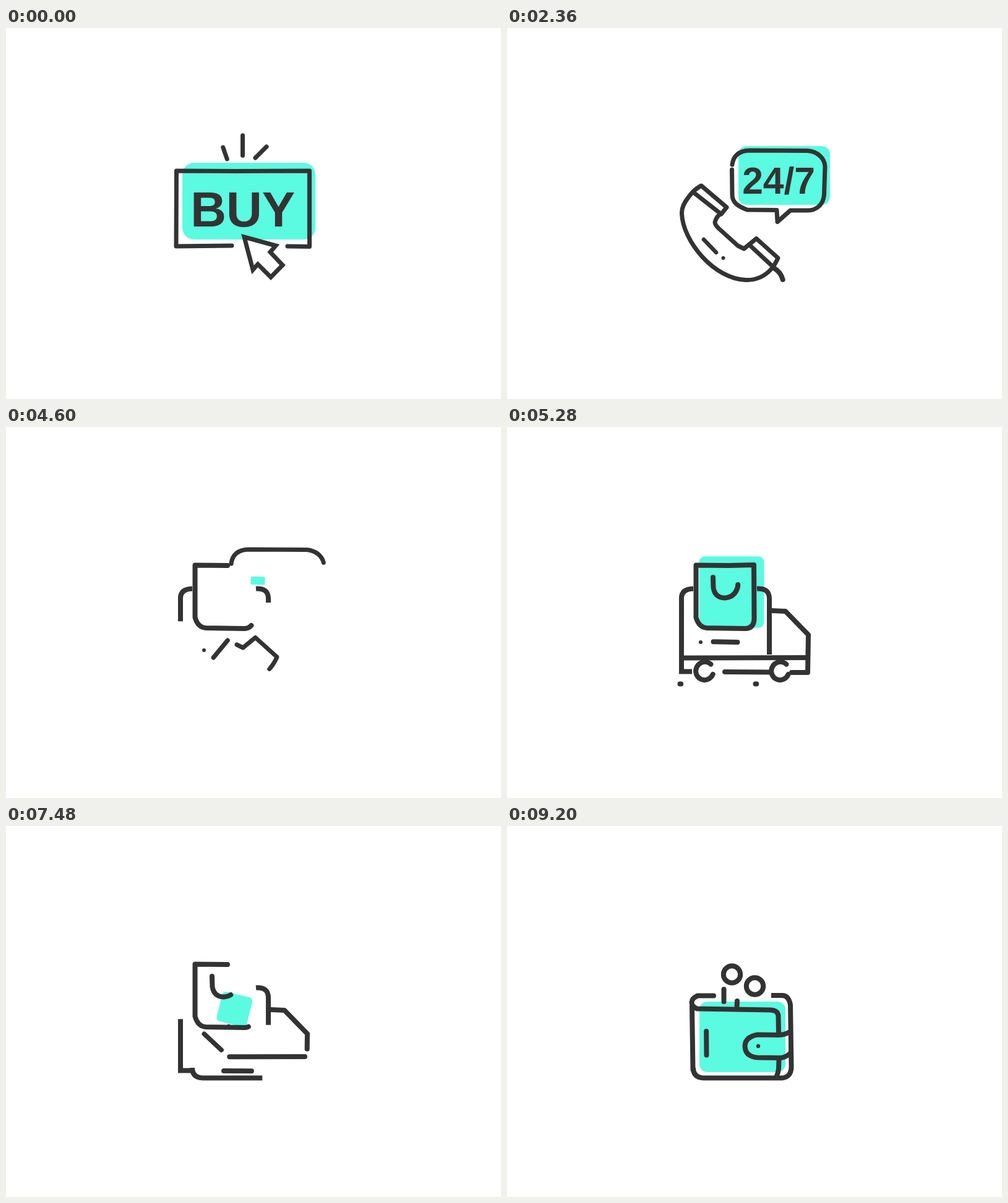
These frames come from a looping animation (800 px wide and 600 px high, 9880 ms). An HTML page:

```html
<!DOCTYPE html>
<html lang="en">
<head>
<meta charset="utf-8">
<title>Shopping icons</title>
<style>
  html, body { margin: 0; width: 100%; height: 100%; overflow: hidden; background: #fff; }
  svg { display: block; width: 100vw; height: 100vh; }
  text { font-family: "Liberation Sans", Arial, Helvetica, sans-serif; font-weight: 700; fill: #333; text-anchor: middle; }
  .ink { fill: none; stroke: #333; stroke-linejoin: round; }
</style>
</head>
<body>
<svg id="stage" viewBox="0 0 800 600"></svg>
<script>
const LOOP = 9880, STEP = 40;
const stage = document.getElementById('stage');

const ease = {
  lin: u => u,
  in: u => u * u,
  out: u => 1 - (1 - u) * (1 - u),
  io: u => u < .5 ? 4 * u ** 3 : 1 - 4 * (1 - u) ** 3
};

const add = (tag, attrs, text) => {
  const el = document.createElementNS('http://www.w3.org/2000/svg', tag);
  for (const k in attrs) el.setAttribute(k, attrs[k]);
  if (text) el.textContent = text;
  return stage.appendChild(el);
};
const show = (el, on) => el.setAttribute('visibility', on ? 'visible' : 'hidden');
const span = (t, [a, b]) => ease.io(Math.min(1, Math.max(0, (t - a) / (b - a))));

// keys: [time, easing into this key, ...values]
function track(keys, t) {
  if (t <= keys[0][0]) return keys[0].slice(2);
  for (let i = 1; i < keys.length; i++) {
    const a = keys[i - 1], b = keys[i];
    if (t < b[0]) {
      const p = ease[b[1]]((t - a[0]) / (b[0] - a[0]));
      return a.slice(2).map((v, j) => v + (b[j + 2] - v) * p);
    }
  }
  return keys[keys.length - 1].slice(2);
}

const parts = [];

// A stroke that draws itself on, then wipes off from its end (or its start with tail)
function stroke(d, on, off, { w = 7.5, cap = 'round', tail = false, spin = null } = {}) {
  const el = add('path', { d, class: 'ink', 'stroke-width': w, 'stroke-linecap': cap, pathLength: 100 });
  if (cap === 'butt') el.style.strokeLinejoin = 'miter';
  parts.push(t => {
    const a = on ? span(t, on) : 1, b = off ? span(t, off) : 0;
    const from = tail ? b : 0, to = tail ? a : a * (1 - b);
    show(el, to - from > .002);
    el.setAttribute('stroke-dasharray', to - from > .999 ? 'none' : `${(to - from) * 100} 300`);
    el.setAttribute('stroke-dashoffset', -from * 100);
    if (spin) el.setAttribute('transform', `rotate(${(t - 5000) * .4} ${spin})`);
  });
}

// values: centre x, centre y, angle, length, width
function bar(keys) {
  const el = add('line', { class: 'ink', 'stroke-linecap': 'round' });
  parts.push(t => {
    const [x, y, deg, len, w] = track(keys, t);
    const a = deg * Math.PI / 180, dx = Math.cos(a) * len / 2, dy = Math.sin(a) * len / 2;
    show(el, w > .1);
    const at = { x1: x - dx, y1: y - dy, x2: x + dx, y2: y + dy, 'stroke-width': w };
    for (const k in at) el.setAttribute(k, at[k]);
  });
}

// values: x, y, scale, angle
function sprite(el, keys) {
  parts.push(t => {
    const [x, y, s, r] = track(keys, t);
    show(el, s > .01);
    el.setAttribute('transform', `translate(${x} ${y}) rotate(${r}) scale(${s})`);
  });
}

const ring = (x, y, rx, ry = rx) =>
  `M${x} ${y - ry}A${rx} ${ry} 0 1 1 ${x} ${y + ry}A${rx} ${ry} 0 1 1 ${x} ${y - ry}`;

// Mint panel: centre x, centre y, width, height, angle, corner
const panel = add('rect', { fill: '#5bfbe1' });
const panelKeys = [
  [760, 'lin', 392.5, 280, 215, 124, 0, 19],
  [1240, 'in', 397, 277, 164, 95, 10, 15],
  [1480, 'lin', 419, 260, 6, 4, 20, 1],
  [2000, 'out', 448, 238.5, 148, 95, 0, 13],
  [4040, 'lin', 448, 238.5, 148, 95, 0, 13],
  [4600, 'in', 407, 248.5, 23, 13, 1.5, 2],
  [4680, 'lin', 398, 252, 2, 2, 0, 0],
  [5240, 'out', 363, 267, 105, 116, 0, 9],
  [5480, 'io', 363, 267, 92, 102, 0, 9],
  [7040, 'lin', 363, 267, 92, 102, 0, 9],
  [7480, 'in', 369.3, 296.5, 50, 49, 14, 6],
  [7600, 'lin', 372, 310, 6, 6, 20, 1],
  [8200, 'out', 381, 341, 146, 124, 0, 14],
  [8480, 'io', 380.5, 341, 139, 114, 0, 13]
];
parts.push(t => {
  const [x, y, w, h, r, c] = track(panelKeys, t);
  const at = { x: x - w / 2, y: y - h / 2, width: w, height: h, rx: c, transform: `rotate(${r} ${x} ${y})` };
  for (const k in at) panel.setAttribute(k, at[k]);
});

// Button frame
stroke('M365 352L275 353L275.5 231L372 231.5', null, [840, 1800], { w: 7 });
stroke('M367 231.5L490.5 231L490.5 353.5L455 353', null, [800, 1760], { w: 7 });

// Handset, speech bubble, cord
stroke('M373 352L383 357L403 340.5L438 372Q433 383 427 390C415 403 400 408 386 407.5C335 406 284 345 282.5 300Q282 288 293 274Q302 261 314 255L355 290L347 300Q339 303 336 314Q336 318 342 324L373 352',
  [1080, 2040], [4000, 4960], { w: 7 });
stroke('M364 221C366 205 377 198.5 392 198L486 198.5C502 200 513 210 514 224L512.5 270C511 286 500 295 486 295L458 295L437 313.5L436 294.5L388 294C375 289 364 283 364 270L363.5 229',
  [1240, 2040], [4074, 5034], { w: 7 });
stroke('M431 388Q443 395 446 408Q449 420 444 431', [2080, 2640], [4040, 4480], { w: 8 });

// Truck and bag
const body = { w: 8, cap: 'butt' }, bold = { w: 8 };
stroke('M301 261.5Q282 262 282 277L282 395.5L299 395.5', [4155, 5115], [7040, 8000], { ...body, tail: true });
stroke('M404 261.5Q424 260 424 278L424 368', [4195, 5155], [7040, 8000], body);
stroke('M358 224L305.5 223.5L305.5 308Q310 324 323 325L386 326Q400 325 399.5 308L399 223L358 224', [4074, 5034], [7040, 8000], bold);
stroke('M333 243L333.5 260Q336 276 352 276.5Q369 275 373 258L374 241.5', [4960, 5440], [7040, 8000], bold);
stroke('M428 297L450 298L487 336L486 397L460 397', [4600, 5080], [7040, 8000], bold);
stroke('M285 373.5L483 373', [4680, 5280], [7040, 8000], { w: 8, tail: true });
stroke('M352 396L425 396.5', [4800, 5360], [7040, 8000], bold);
for (const x of [319.5, 441.5]) {
  stroke(ring(x, 394.5, 14.7, 14.3), [5000, 5440], [7040, 7400], { w: 8, spin: `${x} 394.5` });
  stroke(`M${x - 40} 415.5h71`, [5200, 5640], [7040, 7400], bold);
}

// Wallet
stroke('M301 391Q301 407 318 407.5L445 407.5Q459 406 459.5 390L458 289Q455 274 445 274L427 274', [7040, 8000], null, body);
stroke('M300.5 394L299 292', [7520, 8000], null, bold);
stroke('M334 274.5L308 274.5C296 280 295 290 307 295.5L425 297.5Q438 298 438.5 307L439 335', [7480, 8360], null, bold);
stroke('M457 333Q448 338 438 338L405 337.5Q385 341 384.5 356Q385 373 405 374.5L440 375Q450 375 457 368', [7720, 8400], null, bold);
stroke('M439.5 377L439 393Q438 400 436 404', [8200, 8560], null, bold);
stroke('M350.5 284L350.5 264', [8560, 8960], null, bold);
stroke('M371.5 293L372 283', [8560, 8960], null, bold);
stroke(ring(363.5, 240, 13.7), [8640, 9200], null, bold);
stroke(ring(400.5, 259, 13.7), [8640, 9200], null, bold);

// Rays that turn into the ear pieces
bar([
  [1000, 'lin', 354, 202.5, 71, 20, 7],
  [1240, 'in', 336.3, 201.5, 71, 20, 7],
  [1960, 'out', 324.5, 284, 38, 55, 7],
  [4040, 'lin', 324.5, 284, 38, 55, 7],
  [4440, 'io', 324.5, 284, 38, 0, 0]
]);
bar([
  [1000, 'lin', 412, 201, -45, 25.5, 7],
  [1240, 'in', 441, 223.5, -6, 26, 7],
  [1960, 'out', 412.5, 370, 43, 50, 7],
  [4040, 'lin', 412.5, 370, 43, 50, 7],
  [4440, 'io', 412.5, 370, 43, 0, 0]
]);
// Dash that travels through all four icons
bar([
  [1000, 'lin', 382.5, 190, 90, 32.5, 7],
  [1240, 'in', 387.3, 196.3, 17.4, 32.4, 7],
  [2000, 'out', 328, 352.5, -134, 29, 6.5],
  [3320, 'lin', 328, 352.5, -134, 29, 6.5],
  [3620, 'io', 309, 409, -62, 32, 6.5],
  [3920, 'io', 328, 352.5, -134, 29, 6.5],
  [4040, 'lin', 328, 352.5, -134, 29, 6.5],
  [4600, 'in', 346.7, 359, -50.5, 36, 7.2],
  [5000, 'out', 353, 347.7, 1, 39, 8],
  [7040, 'lin', 353, 347.7, 1, 39, 8],
  [7480, 'in', 334.2, 349.2, 43, 38, 7.6],
  [7960, 'out', 322.3, 351.3, 89.5, 38.5, 8]
]);

const dot = add('circle', { fill: '#333' });
const dotKeys = [
  [1080, 'lin', 388, 240, 0],
  [1240, 'in', 387, 249, 3],
  [1960, 'out', 349.5, 372, 3],
  [4040, 'lin', 349.5, 372, 3],
  [4600, 'in', 320, 361, 3],
  [5000, 'out', 313, 348, 3],
  [7040, 'lin', 313, 348, 3],
  [7480, 'in', 360, 323.5, 3],
  [8000, 'out', 406, 356, 3.2]
];
parts.push(t => {
  const [x, y, r] = track(dotKeys, t);
  dot.setAttribute('cx', x);
  dot.setAttribute('cy', y);
  dot.setAttribute('r', r);
});

sprite(add('text', { y: 28, 'font-size': 80 }, 'BUY'), [
  [640, 'lin', 382.7, 293, 1, 0],
  [1080, 'io', 384, 290, 0, 0]
]);
sprite(add('text', { y: 21.5, 'font-size': 60.5 }, '24/7'), [
  [1960, 'lin', 439, 246, 0, 0],
  [2320, 'out', 439, 246, 1, 0],
  [4040, 'lin', 439, 246, 1, 0],
  [4440, 'io', 436, 225, 0, 0]
]);
sprite(add('path', {
  d: 'M0 0L51 14L42 24.5L62 45.5L43 65L22 44L14 53Z',
  fill: '#fff', stroke: '#333', 'stroke-width': 7
}), [
  [0, 'lin', 385, 338, 1, 0],
  [400, 'io', 390, 344, 1, 0],
  [760, 'io', 385, 338, 1, 0],
  [840, 'lin', 385, 338, 1, 0],
  [1240, 'io', 384.5, 335.5, .08, 15],
  [1280, 'lin', 384.5, 335.5, 0, 15]
]);

const start = performance.now();
function frame() {
  const t = Math.floor(((performance.now() - start) % LOOP) / STEP) * STEP;
  parts.forEach(draw => draw(t));
  requestAnimationFrame(frame);
}
frame();
</script>
</body>
</html>
```
